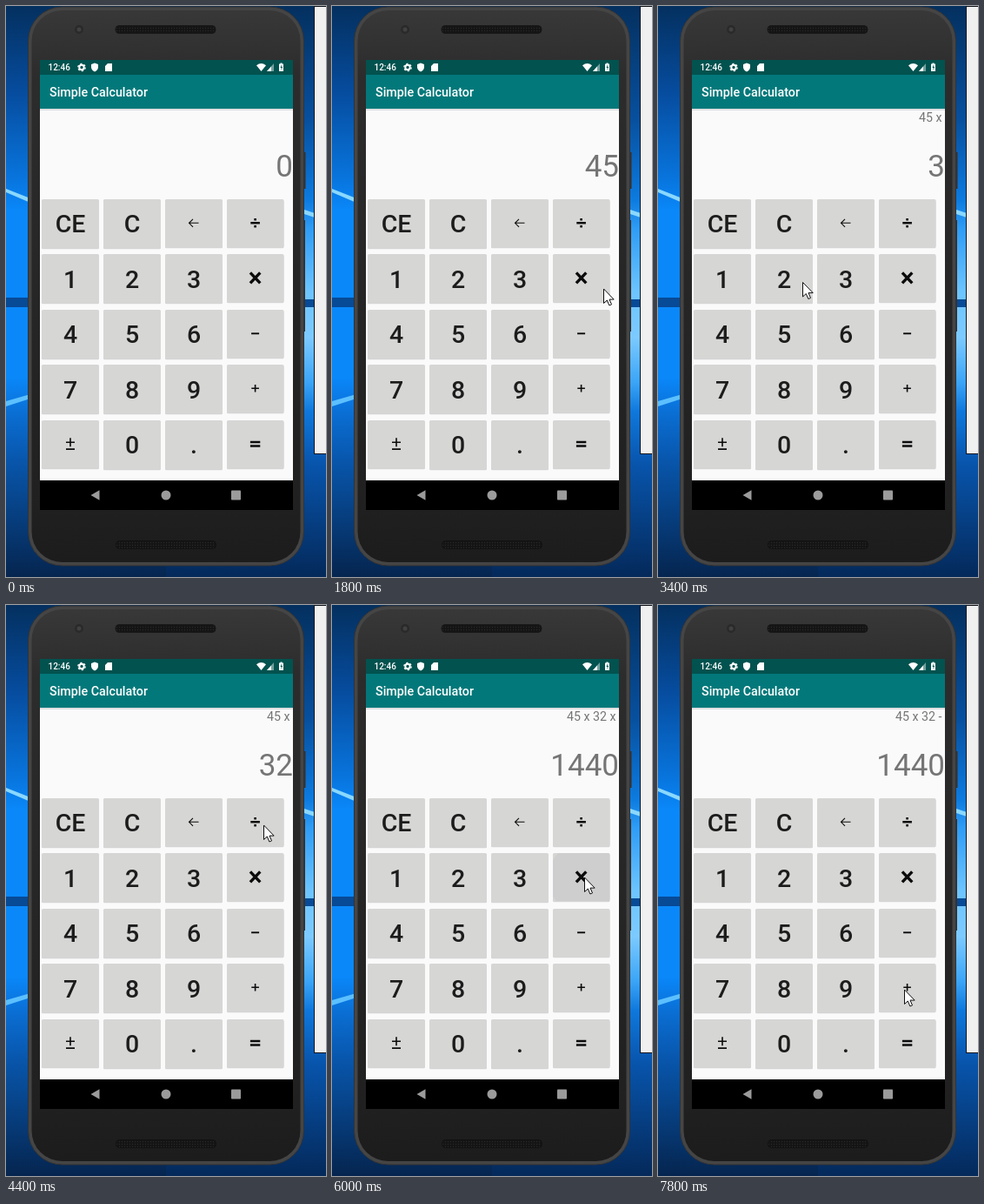
Recreate the animation shown at these times as an HTML page. Size 368 by 656 pixels, loop 8000 ms.

```html
<!DOCTYPE html>
<html lang="en">
<head>
<meta charset="utf-8">
<title>Simple Calculator</title>
<style>
  html, body { margin: 0; width: 100%; height: 100%; overflow: hidden; background: #05295c; }
  svg { display: block; width: 368px; height: 656px; }
  text { font-family: Roboto, sans-serif; }
  .medium { font-weight: 500; }
  .key { font-size: 28.5px; font-weight: 500; fill: #1c1c1c; text-anchor: middle; }
  .readout { fill: #757575; text-anchor: end; }
  .sign { fill: none; stroke: #0c0c0c; }
</style>
</head>
<body>
<svg viewBox="0 0 368 656">
  <defs>
    <linearGradient id="leftSky" x2="0" y2="1">
      <stop offset="0" stop-color="#04305f"/>
      <stop offset=".15" stop-color="#064c9e"/>
      <stop offset=".3" stop-color="#0874dc"/>
      <stop offset=".36" stop-color="#0a88fa"/>
      <stop offset=".65" stop-color="#0a88fa"/>
      <stop offset=".72" stop-color="#0a6cd0"/>
      <stop offset=".8" stop-color="#0855aa"/>
      <stop offset="1" stop-color="#05254f"/>
    </linearGradient>
    <linearGradient id="rightSky" x2="0" y2="1">
      <stop offset="0" stop-color="#04305f"/>
      <stop offset=".2" stop-color="#07509f"/>
      <stop offset=".34" stop-color="#0c7be0"/>
      <stop offset=".39" stop-color="#2f9cf5"/>
      <stop offset=".5" stop-color="#6cc4ff"/>
      <stop offset=".58" stop-color="#7ccaff"/>
      <stop offset=".66" stop-color="#3aa4f7"/>
      <stop offset=".71" stop-color="#0f78dc"/>
      <stop offset=".8" stop-color="#0855ad"/>
      <stop offset="1" stop-color="#04295a"/>
    </linearGradient>
    <linearGradient id="face" x2="0" y2="1">
      <stop offset="0" stop-color="#383838"/>
      <stop offset=".12" stop-color="#2c2c2c"/>
      <stop offset=".9" stop-color="#202020"/>
      <stop offset="1" stop-color="#1c1c1c"/>
    </linearGradient>
    <pattern id="mesh" width="3" height="3" patternUnits="userSpaceOnUse">
      <rect width="3" height="3" fill="#141414"/><circle cx="1.5" cy="1.5" r=".7" fill="#282828"/>
    </pattern>
    <clipPath id="pressedKey"><rect id="pressedBox" rx="1.5"/></clipPath>
  </defs>

  <!-- desktop -->
  <rect width="184" height="656" fill="url(#leftSky)"/>
  <rect x="184" width="184" height="656" fill="url(#rightSky)"/>
  <path d="M0 210L28 221V226L0 214ZM340 233L355 238V243L340 238Z" fill="#8ad8ff"/>
  <path d="M0 454L28 446V451L0 460Z" fill="#5cc0ff"/>
  <path d="M0 335H30V346H0ZM340 337H368V346H340Z" fill="#074a96"/>
  <rect x="354.500" y=".5" width="20" height="514" fill="#f0f0f1" stroke="#10151c"/>

  <!-- phone -->
  <path d="M341 168h3.500v42H341ZM341 246h3v128H341Z" fill="#333"/>
  <rect x="25.500" y="1" width="317" height="642" rx="39" fill="#454545" stroke="#333"/>
  <rect x="29.500" y="5" width="309" height="634" rx="35" fill="url(#face)"/>
  <circle cx="84" cy="27" r="5" fill="#2a2a2a"/>
  <circle cx="84" cy="27" r="2.500" fill="#414141"/>
  <rect x="126" y="22.500" width="115" height="9" rx="4" fill="url(#mesh)" stroke="#181818"/>
  <rect x="126.500" y="614.500" width="115" height="9" rx="4" fill="url(#mesh)" stroke="#111"/>

  <!-- screen -->
  <rect x="39" y="62" width="291" height="517" fill="#fafafb"/>
  <rect x="39" y="118" width="291" height="2" fill="#dedfe0"/>
  <rect x="39" y="79" width="291" height="39" fill="#03787a"/>
  <rect x="39" y="62" width="291" height="17" fill="#02524f"/>
  <rect x="39" y="545" width="291" height="34"/>
  <g fill="#fff">
    <text class="medium" x="48.500" y="74" font-size="10">12:46</text>
    <text class="medium" x="50" y="104" font-size="14.3">Simple Calculator</text>
    <path d="M102 65.500l4 1.500v3.200q0 3.300-4 5.300q-4-2-4-5.300V67Z"/>
    <path d="M117 66h5v9h-8v-6Z"/>
    <path d="M288 68.200q5.500-4.400 11 0L293.500 75Z"/>
    <path d="M308 66v9h-8Z" opacity=".45"/>
    <path d="M305 69.400V75h-5Z"/>
    <path d="M315.500 65.500h2v1h1.500v8.500h-5v-8.500h1.500Z"/>
  </g>
  <circle cx="87" cy="70.500" r="2.700" fill="none" stroke="#fff" stroke-width="2"/>
  <circle cx="87" cy="70.500" r="4.200" fill="none" stroke="#fff" stroke-width="1.300" stroke-dasharray="2.200 2.200"/>
  <path d="M317 67l-1.500 4h1.200l-.4 3 1.800-4h-1.200Z" fill="#02524f"/>
  <g fill="#9b9b9b">
    <path d="M97.500 562l10-5.800v11.600Z"/>
    <circle cx="184" cy="562" r="5.500"/>
    <rect x="259" y="556.500" width="11" height="11" rx=".8"/>
  </g>

  <g id="keys"></g>
  <circle id="ripple" clip-path="url(#pressedKey)"/>
  <g id="signs"></g>
  <text id="history" class="readout" x="326.500" y="133" font-size="14.2"></text>
  <text id="value" class="readout" x="330" y="196" font-size="35"></text>
  <path id="pointer" d="M0 0V16.500L3.800 13 6.400 19 9 17.900 6.500 12.100H11.700Z"
        fill="#fff" stroke="#111" stroke-linejoin="round"/>
</svg>
<script>
const LOOP = 8000, STEP = 200;
const $ = id => document.getElementById(id);

const keyLayout = ['CE C ← ÷', '1 2 3 ×', '4 5 6 −', '7 8 9 +', '± 0 . ='].map(row => row.split(' '));

// Sign strokes, relative to the key centre: [path, line width]
const signs = {
  '←': ['M5.500 0H-5M-1-4.500L-5.500 0L-1 4.500', 1.1],
  '÷': ['M-5.300 0H5.300M-1.300-4H1.300M-1.300 4H1.300', 2.5],
  '×': ['M-5.700-6L5.700 6M5.700-6L-5.700 6', 3.4],
  '−': ['M-4.500 0H4.500', 1.9],
  '+': ['M-4.300 0H4.300M0-4.300V4.300', 1.6],
  '=': ['M-5.700-2.200H5.700M-5.700 2.200H5.700', 2.5],
  '±': ['M-5-2H5M0-7V3M-5 5.800H5', 1.6]
};

const keys = {};
keyLayout.forEach((row, r) => row.forEach((label, c) => {
  const top = 221.6 + r * 63.6;
  const x = 41 + c * 71, y = Math.round(top);
  const sign = signs[label], width = c === 3 ? 65.5 : 66, height = sign ? 55 : 56;
  keys[label] = { x, y, width, height };
  const box = `x="${x}" width="${width}" height="${height}" rx="1.5"`;
  $('keys').innerHTML += `<rect ${box} y="${y + 1.2}" fill="#bbb" opacity=".6"/><rect ${box} y="${y}" fill="#d6d6d5"/>`;
  const cx = x + 33;
  $('signs').innerHTML += sign
    ? `<path class="sign" transform="translate(${cx - (c === 3 ? .4 : 0)} ${y + 27.3})" d="${sign[0]}" stroke-width="${sign[1]}"/>`
    : `<text class="key" x="${cx}" y="${Math.round(top + 38.4)}">${label}</text>`;
}));

// Pointer stops: [time, x, y]
const stops = [
  [200, 56, 420], [400, 76, 384], [800, 76, 384], [1000, 143, 382], [1400, 143, 382],
  [1800, 312.5, 325], [2200, 312.5, 325], [2400, 290, 315], [2600, 290, 315],
  [3000, 217, 316], [3200, 217, 316], [3400, 166.5, 317.5], [3600, 148, 317], [3800, 148, 317],
  [4400, 296.5, 253], [4600, 291, 251], [4800, 291, 251], [5400, 290.5, 313], [6000, 290.5, 313],
  [6600, 286.5, 375], [7000, 286.5, 375], [7600, 283.5, 442], [8000, 283.5, 442]
];

const presses = [[600, '4'], [1200, '5'], [2400, '×'], [3000, '3'], [3600, '2'],
                 [4600, '÷'], [5800, '×'], [6800, '−']];

// Readouts: [time, history, value]
const readouts = [
  [0, '', '0'], [600, '', '4'], [1200, '', '45'], [2600, '45 x', '45'], [3200, '45 x', '3'],
  [3800, '45 x', '32'], [4800, '45 x 32 ÷', '1440'], [6000, '45 x 32 x', '1440'], [7000, '45 x 32 -', '1440']
];

const latest = (list, t) => list.filter(item => item[0] <= t).pop();

function pointerAt(t) {
  const i = stops.findIndex(stop => stop[0] > t);
  const [t0, x0, y0] = stops[i - 1], [t1, x1, y1] = stops[i];
  const p = (t - t0) / (t1 - t0), ease = p * p * (3 - 2 * p);
  return [x0 + (x1 - x0) * ease, y0 + (y1 - y0) * ease];
}

function setAttributes(id, values) {
  for (const name in values) $(id).setAttribute(name, values[name]);
}

function drawRipple(t) {
  const press = latest(presses, t), age = press ? (t - press[0]) / STEP : 2;
  if (age >= 2) return setAttributes('ripple', { opacity: 0 });
  const box = keys[press[1]], [cx, cy] = pointerAt(press[0]);
  setAttributes('pressedBox', box);
  setAttributes('ripple', { cx, cy: cy + 1, r: 24 + 18 * age, opacity: .07 - .035 * age });
}

function draw(now) {
  const t = Math.floor(now % LOOP / STEP) * STEP;
  const [, history, value] = latest(readouts, t);
  $('history').textContent = history;
  $('value').textContent = value;
  drawRipple(t);
  const visible = t >= stops[0][0];
  setAttributes('pointer', {
    visibility: visible ? 'visible' : 'hidden',
    transform: `translate(${visible ? pointerAt(t) : '0'})`
  });
}

const start = performance.now();
function frame() {
  draw(performance.now() - start);
  requestAnimationFrame(frame);
}
frame();
</script>
</body>
</html>
```
